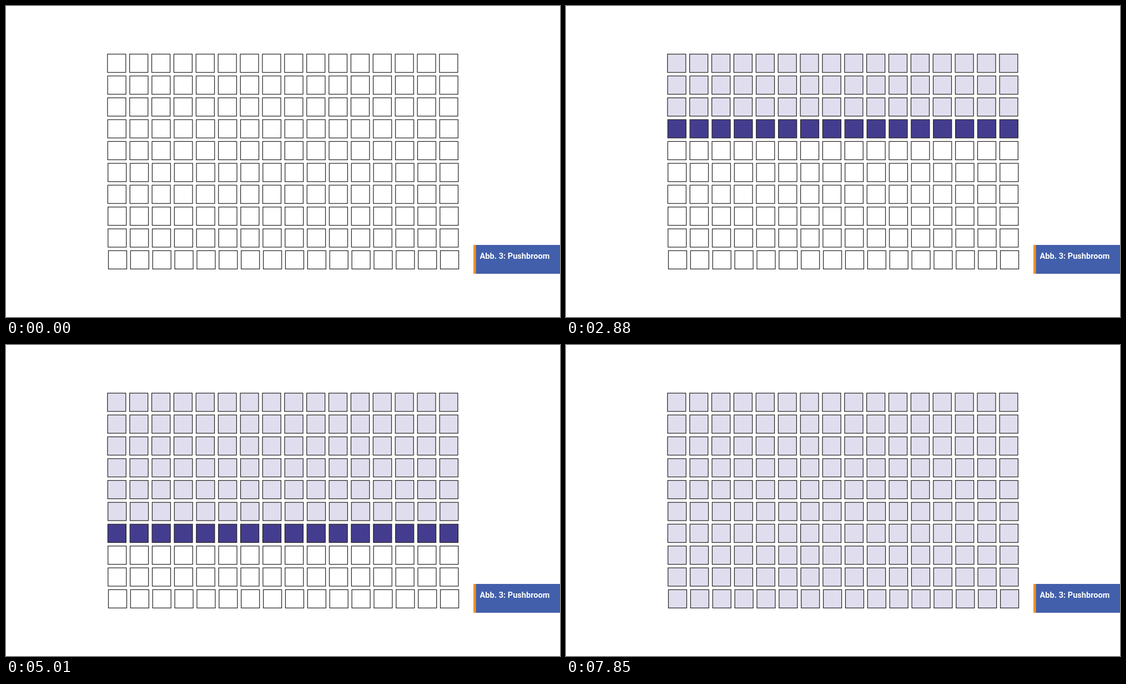
Recreate the animation shown at these times as an HTML page. Size 998 px wide and 561 px high, loop 8180 ms.

```html
<!DOCTYPE html>
<html lang="de">
<head>
<meta charset="utf-8">
<title>Pushbroom</title>
<style>
  html, body { margin: 0; width: 100%; height: 100%; overflow: hidden; background: #fff; }
  svg { display: block; }
  #grid { stroke: #231f20; stroke-width: 1.2; }
  text { font: 700 14.6px Roboto, sans-serif; fill: #fff; }
</style>
</head>
<body>
<svg width="998" height="561" viewBox="0 0 998 561">
  <g id="grid"></g>
  <rect x="842" y="431" width="156" height="52" fill="#425fab"/>
  <rect x="842" y="431" width="4.5" height="52" fill="#f0932b"/>
  <text x="853.5" y="456">Abb. 3: Pushbroom</text>
</svg>
<script>
const LOOP = 8180, START = 750, STEP = 710;
const COLS = 16, SIZE = 33, PITCH_X = 39.87, PITCH_Y = 39.4;
const EMPTY = '#fff', ACTIVE = '#443d8f', SCANNED = '#e0deee';
// Left edge of each row; the rows are slightly misaligned.
const lefts = [182.8, 183.1, 182.9, 183.3, 183.3, 183.7, 183.4, 183.7, 183.8, 184.5];

const grid = document.getElementById('grid');
const add = (parent, name, attrs) => {
  const el = document.createElementNS('http://www.w3.org/2000/svg', name);
  for (const key in attrs) el.setAttribute(key, attrs[key]);
  return parent.appendChild(el);
};

const rows = lefts.map((left, r) => {
  const row = add(grid, 'g', { fill: EMPTY });
  for (let c = 0; c < COLS; c++) {
    add(row, 'rect', { x: left + c * PITCH_X, y: 86.8 + r * PITCH_Y, width: SIZE, height: SIZE });
  }
  return row;
});

const begin = performance.now();
function draw() {
  const t = (performance.now() - begin) % LOOP;
  const active = Math.floor((t - START) / STEP);
  rows.forEach((row, r) => {
    row.setAttribute('fill', r < active ? SCANNED : r === active ? ACTIVE : EMPTY);
  });
  requestAnimationFrame(draw);
}
draw();
</script>
</body>
</html>
```
